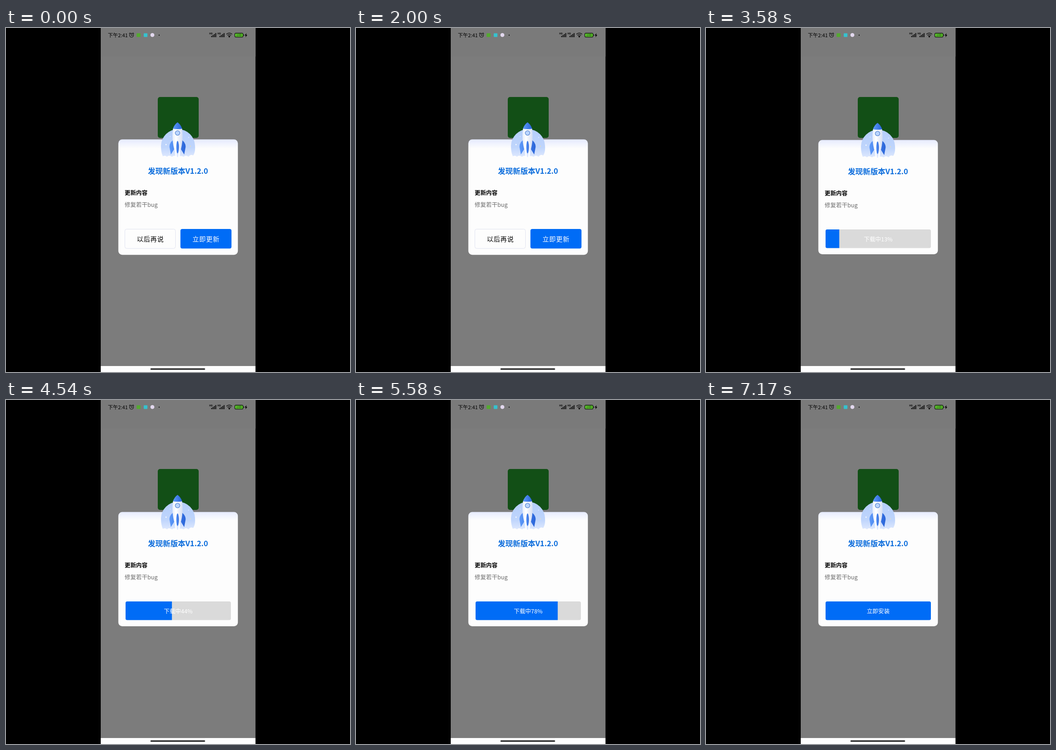
An HTML page that plays this animation: 748x748 px, repeating every 8 s.

```html
<!DOCTYPE html>
<html lang="zh-CN">
<head>
<meta charset="utf-8">
<title>版本更新</title>
<style>
  html, body { margin: 0; width: 100%; height: 100%; overflow: hidden; background: #000; }
  svg { display: block; width: 100vw; height: 100vh; }
  text { font-family: "Noto Sans CJK SC", "Noto Sans CJK", sans-serif; font-size: 12.4px; }
  .middle { text-anchor: middle; }
  .spaced { font-size: 14px; letter-spacing: .7px; }
  .light { fill: #fff; }
</style>
</head>
<body>
<svg viewBox="0 0 748 748">
  <defs>
    <linearGradient id="sheet" gradientUnits="userSpaceOnUse" x1="0" y1="242" x2="0" y2="262">
      <stop stop-color="#e5eaff"/><stop offset="1" stop-color="#fdfdfd"/>
    </linearGradient>
    <linearGradient id="cloud" x2="0" y2="1">
      <stop stop-color="#b4cefb"/><stop offset=".65" stop-color="#bfd5fc"/><stop offset="1" stop-color="#dfe9fe"/>
    </linearGradient>
    <linearGradient id="hull">
      <stop stop-color="#e6edfb"/><stop offset=".35" stop-color="#fff"/><stop offset="1" stop-color="#d5def3"/>
    </linearGradient>
    <linearGradient id="blue">
      <stop stop-color="#5f9bfa"/><stop offset="1" stop-color="#2863d8"/>
    </linearGradient>
    <clipPath id="barShape"><rect x="260" y="438" width="229" height="40.5" rx="3.5"/></clipPath>
    <g id="signal">
      <path d="M5.2 20v-3M8.2 20v-5M11.2 20v-7M14.2 20v-9" stroke="#111" stroke-width="1.9"/>
      <text y="14" font-weight="700" style="font-size:4.8px">HD</text>
    </g>
  </defs>

  <rect width="748" height="748"/>
  <rect x="206" width="336.5" height="735" fill="#7c7c7c"/>
  <rect x="206" width="336.5" height="62" fill="#7a7a7a"/>
  <rect x="206" y="735" width="336.5" height="13" fill="#fdfdfd"/>
  <rect x="314" y="740" width="119" height="3.2" rx="1.6" fill="#2b2b2b"/>
  <rect x="330" y="150" width="89" height="89" rx="5" fill="#124f16"/>

  <!-- status bar -->
  <text x="221.6" y="19.6" style="font-size:11px">下午2:41</text>
  <g fill="none" stroke="#111" stroke-width="1.2">
    <circle cx="273" cy="15.8" r="4.2"/>
    <path d="M273 13.2v3h2.2M267.7 12.6l2.6-2.3M278.3 12.6l-2.6-2.3"/>
  </g>
  <rect x="284" y="11.5" width="8.5" height="8" rx="1" fill="#55a832"/>
  <rect x="299.5" y="11.5" width="8" height="8" rx="1" fill="#35c2cf"/>
  <circle cx="318.3" cy="15.3" r="4.3" fill="#e2d8ee"/>
  <circle cx="333" cy="15.6" r="1.1"/>
  <use href="#signal" x="442"/>
  <use href="#signal" x="460"/>
  <g fill="none" stroke="#111" stroke-width="1.5">
    <path d="M479.2 13.5q6.3-5 12.6 0M481.4 16q4.1-3.2 8.2 0M483.5 18.2q2-1.5 4 0"/>
  </g>
  <circle cx="485.5" cy="19.3" r="1.2"/>
  <rect x="497.5" y="11.2" width="18" height="8.6" rx="2.6" fill="#5cc52c" stroke="#151515" stroke-width="1.2"/>
  <path d="M517 14v3" stroke="#151515" stroke-width="1.3"/>
  <text class="middle" x="506.5" y="18.3" fill="#173a0c" style="font-size:7.5px">100</text>
  <path d="M523 11l-4 5.2h2.5l-1 4 4.3-5.3h-2.6z"/>

  <rect id="card" x="244.3" width="259.9" rx="8.5" fill="url(#sheet)"/>

  <g id="content">
    <path fill="url(#cloud)" d="M341 279Q337 270 337 257A37 37 0 0 1 411 257Q412 270 407 277Q401 274 397 280Q391 275 386 280Q380 276 373 281Q367 275 361 280Q354 275 350 280Q346 276 341 279Z"/>
    <g fill="#fff">
      <path d="M367 267h4l1 14h-4zM375 267h4l-1 14h-4z" opacity=".85"/>
      <circle cx="348" cy="253.5" r="1.3"/><circle cx="357" cy="236" r=".7"/><circle cx="397" cy="238" r=".8"/>
    </g>
    <circle cx="401" cy="257" r="1" fill="#f3dfae"/>
    <path fill="url(#blue)" d="M363 244Q355 250 355.5 259L358.5 275L366 263ZM383 244Q391 250 390.5 259L387.5 275L380 263Z"/>
    <path fill="url(#hull)" d="M363 219Q373 215 383 219Q386 246 379 268Q373 271 367 268Q360 246 363 219Z"/>
    <path fill="url(#blue)" d="M373 205Q380 210 383 219Q373 221 363 219Q366 210 373 205Z"/>
    <circle cx="373" cy="228.3" r="4.9" fill="#bcd5fc" stroke="#5787d5" stroke-width="1.3"/>
    <ellipse cx="373" cy="259" rx="2.8" ry="13.5" fill="url(#blue)"/>

    <text class="middle" x="374" y="317" font-weight="700" fill="#0a6cdc" style="font-size:16.3px">发现新版本V1.2.0</text>
    <text x="258" y="362.8" font-weight="700">更新内容</text>
    <text x="258" y="389.2" fill="#6b6b6b">修复若干bug</text>
  </g>

  <g id="choices">
    <rect x="258.5" y="437.3" width="110" height="42" rx="4" fill="#fdfdfd" stroke="#e1e3f1"/>
    <rect x="379.3" y="437" width="111" height="42.6" rx="4" fill="#006cf6"/>
    <text class="middle spaced" x="314" y="464.3">以后再说</text>
    <text class="middle spaced light" x="435" y="464.3">立即更新</text>
  </g>

  <g id="download">
    <g clip-path="url(#barShape)">
      <rect x="260" y="438" width="229" height="41" fill="#dadada"/>
      <rect id="fill" x="260" y="438" height="41" fill="#006cf6"/>
    </g>
    <text id="waiting" class="spaced light" x="342.6" y="464.3">下载中...</text>
    <text id="label" class="middle light" x="374.5" y="463.6"></text>
  </g>
</svg>
<script>
  const LOOP = 8000, PRESSED = 2920, STARTED = 3210, MOVING = 3420, DONE = 7170;
  const el = id => document.getElementById(id);
  const show = (id, on) => el(id).style.display = on ? '' : 'none';

  // Progress in percent; it stalls at 99 until the file is ready.
  function progress(t) {
    if (t < STARTED || t >= DONE) return 100;
    if (t < MOVING) return 0;
    return Math.min(99, Math.round(13 + (t - 3580) * .0326));
  }

  function draw(t) {
    const pressed = t >= PRESSED, percent = progress(t);
    el('card').setAttribute('y', pressed ? 243.5 : 242.2);
    el('card').setAttribute('height', pressed ? 248.5 : 251);
    el('content').setAttribute('transform', `translate(0 ${pressed ? 1.2 : 0})`);
    show('choices', !pressed);
    show('download', pressed);
    show('waiting', t < STARTED);
    show('label', t >= STARTED);
    el('fill').setAttribute('width', 2.29 * percent);
    el('label').textContent = t < DONE ? `下载中${percent}%` : '立即安装';
  }

  const start = performance.now();
  function tick() {
    draw((performance.now() - start) % LOOP);
    requestAnimationFrame(tick);
  }
  tick();
</script>
</body>
</html>
```
